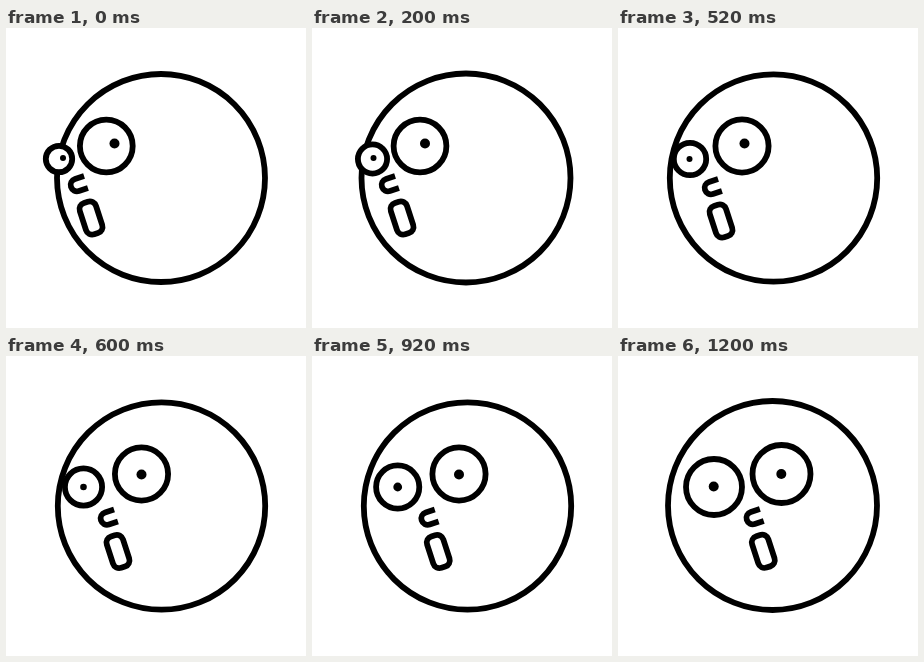
Recreate the animation shown at these times as an HTML page. Size 300 px wide and 300 px high, loop 1400 ms.

```html
<!DOCTYPE html>
<html lang="en">
<head>
<meta charset="utf-8">
<title>Turning face</title>
<style>
  html, body { margin: 0; width: 100%; height: 100%; overflow: hidden; background: #fff; }

  svg {
    display: block; width: 100%; height: 100%;
    fill: #fff; stroke: #000; stroke-width: 5.8;
    animation: turn 1400ms step-end infinite;
  }

  .head { cx: var(--hx); cy: var(--hy); r: var(--hr); }
  .near { cx: var(--nx); cy: 118px; r: var(--nr); }
  .far { cx: var(--fx); cy: 131px; r: var(--fr); }
  .pupil { fill: #000; stroke: none; }
  .near-pupil { cx: var(--npx); cy: var(--npy); r: 5px; }
  .far-pupil { cx: var(--fpx); cy: var(--fpy); r: var(--fpr); }
  .nose { fill: none; transform: translate(var(--ox), var(--oy)) rotate(-18deg); }
  .mouth { transform: translate(var(--mx), var(--my)) rotate(-18deg); }

  /* h: head, n: near eye, f: far eye, p: pupil, o: nose, m: mouth */
  @keyframes turn {
    0% {
      --hx: 155px; --hy: 150px; --hr: 104px;
      --nx: 100.3px; --nr: 26.4px; --npx: 108.5px; --npy: 115.5px;
      --fx: 53px; --fr: 13.2px; --fpx: 57px; --fpy: 130px; --fpr: 3px;
      --ox: 80px; --oy: 154px; --mx: 85px; --my: 190px;
    }
    14.2857% {
      --hx: 154px; --hy: 150px; --hr: 104.5px;
      --nx: 108px; --nr: 26.4px; --npx: 113px; --npy: 115.5px;
      --fx: 60.5px; --fr: 14.6px; --fpx: 61.5px; --fpy: 130px; --fpr: 3px;
      --ox: 85px; --oy: 154px; --mx: 90px; --my: 190px;
    }
    28.5714% {
      --hx: 155.5px; --hy: 150px; --hr: 103.7px;
      --nx: 124px; --nr: 26.6px; --npx: 126.5px; --npy: 115.5px;
      --fx: 72px; --fr: 16.2px; --fpx: 71.5px; --fpy: 131px; --fpr: 3px;
      --ox: 102px; --oy: 157px; --mx: 103px; --my: 193px;
    }
    42.8571% {
      --hx: 155.5px; --hy: 150px; --hr: 103.7px;
      --nx: 135.5px; --nr: 26.6px; --npx: 135.5px; --npy: 118.5px;
      --fx: 77.5px; --fr: 18.6px; --fpx: 77.5px; --fpy: 131px; --fpr: 3.3px;
      --ox: 110px; --oy: 159.5px; --mx: 112px; --my: 195.5px;
    }
    57.1428% {
      --hx: 155.5px; --hy: 150px; --hr: 103.7px;
      --nx: 147px; --nr: 26.6px; --npx: 147px; --npy: 118.5px;
      --fx: 85.7px; --fr: 21.6px; --fpx: 85.7px; --fpy: 131px; --fpr: 4.4px;
      --ox: 124.7px; --oy: 159.5px; --mx: 126.3px; --my: 195.5px;
    }
    71.4285% {
      --hx: 155.5px; --hy: 150px; --hr: 103.7px;
      --nx: 155.8px; --nr: 26.6px; --npx: 155.5px; --npy: 118.5px;
      --fx: 91.5px; --fr: 24.6px; --fpx: 91.5px; --fpy: 131px; --fpr: 4.9px;
      --ox: 136px; --oy: 159.5px; --mx: 137.5px; --my: 195.5px;
    }
    85.7142% {
      --hx: 154.5px; --hy: 149.5px; --hr: 104.5px;
      --nx: 163.5px; --nr: 29px; --npx: 163.3px; --npy: 118px;
      --fx: 96px; --fr: 28px; --fpx: 95.7px; --fpy: 130.5px; --fpr: 5px;
      --ox: 143.8px; --oy: 159px; --mx: 145.3px; --my: 195.3px;
    }
  }
</style>
</head>
<body>
<svg viewBox="0 0 300 300">
  <circle class="head"/>
  <circle class="far"/>
  <circle class="pupil far-pupil"/>
  <circle class="near"/>
  <circle class="pupil near-pupil"/>
  <path class="nose" d="M0-6.3H-9.5a6.3 6.3 0 0 0 0 12.6H0"/>
  <rect class="mouth" x="-8.5" y="-16.5" width="17" height="33" rx="6.5"/>
</svg>
</body>
</html>
```
